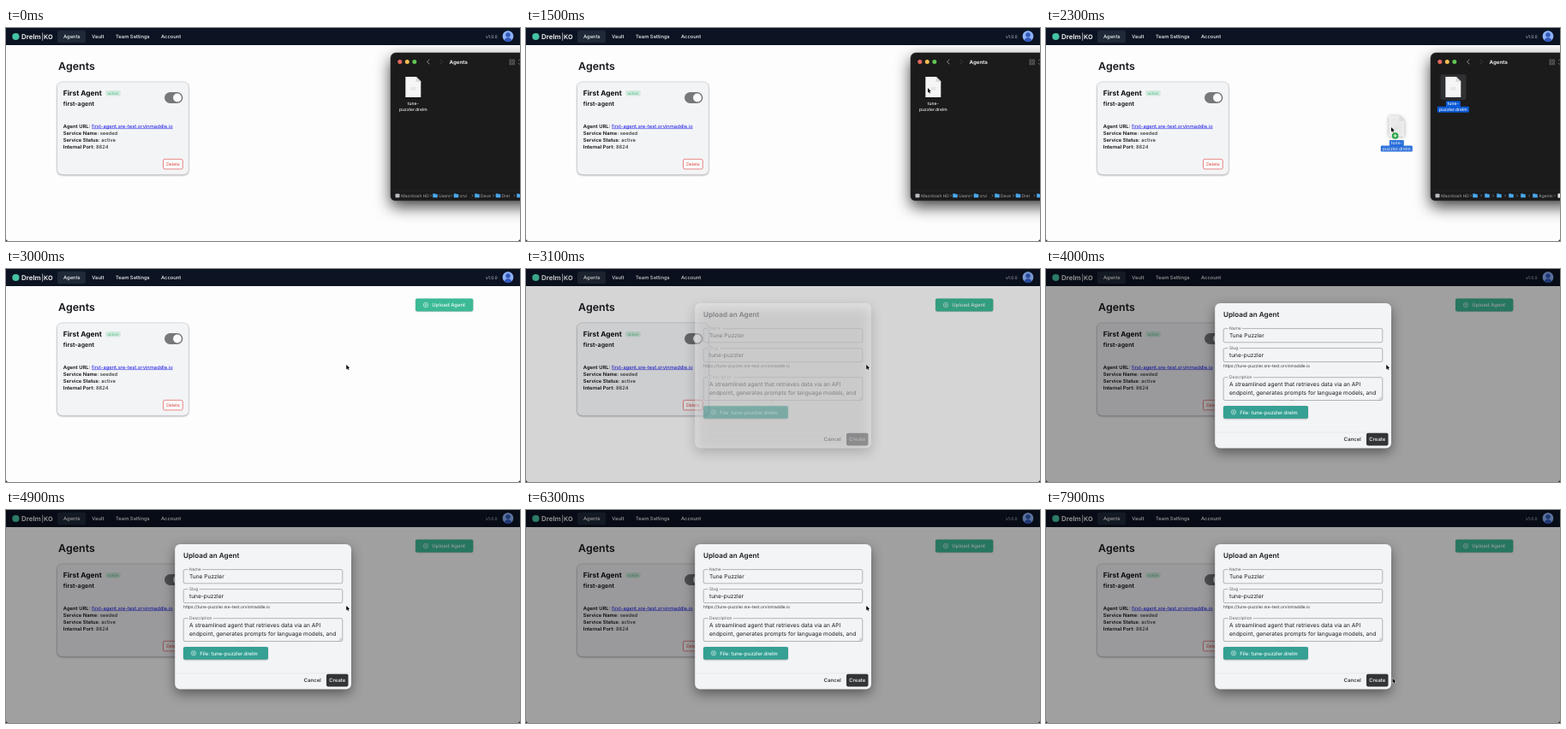
Write an HTML page with a canvas that moves like this. It is 600 by 249 pixels and loops after 8000 ms.

```html
<!DOCTYPE html>
<html lang="en">
<head>
<meta charset="utf-8">
<title>Agent upload</title>
<style>
html, body { margin: 0; width: 100%; height: 100%; overflow: hidden; background: #fdfdfd; }
canvas { display: block; width: 600px; height: 249px; }
</style>
</head>
<body>
<canvas id="stage"></canvas>
<script>
const W = 600, H = 249, LOOP = 8000;
const canvas = document.getElementById('stage');
const ctx = canvas.getContext('2d');
const ratio = window.devicePixelRatio || 1;
canvas.width = W * ratio;
canvas.height = H * ratio;

const HOST = 'sre-test.orvinmaddle.io';
const GRAB = [469, 70.3];
const SELECT_AT = 1600, DRAG_AT = 1700, DROP_AT = 2900;

// Pointer stops: time, x, y
const STOPS = [
  [1000, 602, 112], [1500, ...GRAB], [DRAG_AT, ...GRAB],
  [2300, 403, 116], [2650, 397.3, 112], [7350, 397.3, 112], [7900, 404.6, 196.8]
];

const smooth = p => p * p * (3 - 2 * p);
const progress = (t, a, b) => Math.min(1, Math.max(0, (t - a) / (b - a)));

function pointerAt(t) {
  let i = 0;
  while (i < STOPS.length - 2 && t > STOPS[i + 1][0]) i++;
  const [t0, x0, y0] = STOPS[i], [t1, x1, y1] = STOPS[i + 1];
  const p = smooth(progress(t, t0, t1));
  return [x0 + (x1 - x0) * p, y0 + (y1 - y0) * p];
}

// Type is set large and scaled down evenly, so small sizes keep exact spacing.
const TYPE_SCALE = 10;

function textWidth(str, size, weight = 400) {
  ctx.font = `${weight} ${size * TYPE_SCALE}px Inter, sans-serif`;
  return ctx.measureText(str).width / TYPE_SCALE;
}

function text(str, x, y, size, color, weight = 400, align = 'left') {
  const width = textWidth(str, size, weight);
  ctx.save();
  ctx.translate(x, y);
  ctx.scale(1 / TYPE_SCALE, 1 / TYPE_SCALE);
  ctx.textRendering = 'geometricPrecision';
  ctx.textAlign = align;
  ctx.fillStyle = color;
  ctx.fillText(str, 0, 0);
  ctx.restore();
  return width;
}

function box(x, y, w, h, r, fill, stroke, line = 0.6) {
  ctx.beginPath();
  ctx.roundRect(x, y, w, h, r);
  if (fill) { ctx.fillStyle = fill; ctx.fill(); }
  if (stroke) { ctx.strokeStyle = stroke; ctx.lineWidth = line; ctx.stroke(); }
}

function disc(x, y, r, fill) {
  ctx.beginPath();
  ctx.arc(x, y, r, 0, Math.PI * 2);
  ctx.fillStyle = fill;
  ctx.fill();
}

function poly(points, stroke, line, fill) {
  ctx.beginPath();
  points.forEach(([x, y]) => ctx.lineTo(x, y));
  if (fill) { ctx.closePath(); ctx.fillStyle = fill; ctx.fill(); }
  if (stroke) { ctx.strokeStyle = stroke; ctx.lineWidth = line; ctx.stroke(); }
}

function shadowed(color, blur, dy, draw) {
  ctx.save();
  ctx.shadowColor = color;
  ctx.shadowBlur = blur * ratio;
  ctx.shadowOffsetY = dy * ratio;
  draw();
  ctx.restore();
}

function plus(x, y, r, color, line) {
  poly([[x - r, y], [x + r, y]], color, line);
  poly([[x, y - r], [x, y + r]], color, line);
}

function plusRing(x, y) {
  ctx.beginPath();
  ctx.arc(x, y, 2.7, 0, Math.PI * 2);
  ctx.strokeStyle = '#effaf6';
  ctx.lineWidth = 0.6;
  ctx.stroke();
  plus(x, y, 1.3, '#effaf6', 0.6);
}

function chevron(x, y, w, h, color, line) {
  poly([[x - w, y - h], [x + w, y], [x - w, y + h]], color, line);
}

function navbar() {
  ctx.fillStyle = '#0c1322';
  ctx.fillRect(0, 0, W, 20);
  disc(11.4, 10, 4.1, '#45c3a2');
  text('Drelm', 18, 13, 8, '#f4f5f7', 600);
  poly([[42.6, 5.5], [42.6, 14.8]], '#e4e6ea', 0.7);
  text('KO', 44, 13, 7.4, '#f4f5f7', 600);
  box(60, 2.8, 33, 14.4, 2.5, '#1f2937');
  const items = { Agents: 67, Vault: 100.3, 'Team Settings': 128, Account: 181 };
  for (const [label, x] of Object.entries(items)) text(label, x, 12.2, 5.83, '#f5f6f8', 500);
  text('v1.0.0', 560, 11.8, 5, '#c8cdd6');
  ctx.save();
  ctx.beginPath();
  ctx.arc(586, 9.6, 6.6, 0, Math.PI * 2);
  ctx.clip();
  disc(586, 9.6, 6.6, '#8db1f7');
  disc(586, 8, 2.7, '#3157b8');
  disc(586, 16.2, 4.9, '#3157b8');
  ctx.restore();
}

function agentCard() {
  shadowed('rgba(0,0,0,0.4)', 2, 0.8, () => box(59.6, 63, 153.7, 108.4, 6, '#f3f4f6'));
  box(59.6, 63, 153.7, 108.4, 6, null, '#c3c6cb', 0.5);
  text('First Agent', 66.8, 79, 8.4, '#0c0d10', 700);
  box(116, 73, 18, 6.6, 3.3, '#cfeadd');
  text('active', 125, 77.7, 4.3, '#58b986', 400, 'center');
  text('first-agent', 66.8, 91, 7, '#0c0d10', 600);
  box(185, 75, 21.4, 13, 6.5, '#77787b');
  disc(200, 81.5, 4.9, '#fbfbfc');

  const rows = [
    ['Agent URL:', 'first-agent.' + HOST], ['Service Name:', 'seeded'],
    ['Service Status:', 'active'], ['Internal Port:', '8824']
  ];
  rows.forEach(([label, value], i) => {
    const y = 116.6 + i * 8.2;
    const x = 66.8 + text(label, 66.8, y, 5.83, '#0c0d10', 600) + 1.7;
    const w = text(value, x, y, 5.83, i ? '#15171b' : '#1414e6');
    if (!i) poly([[x, y + 1], [x + w, y + 1]], '#1414e6', 0.5);
  });

  box(183.5, 153.3, 22.8, 11.6, 1.8, '#fafafa', '#e25555', 0.7);
  text('Delete', 194.9, 161, 5.1, '#e03d3d', 400, 'center');
}

function page() {
  ctx.fillStyle = '#111';
  ctx.fillRect(0, 0, W, H);
  box(0, 0, W, H, [0, 0, 3, 3], '#fdfdfd');
  navbar();
  text('Agents', 61, 49, 12.5, '#15171b', 600);
  shadowed('rgba(0,0,0,0.25)', 1.5, 0.5, () => box(478, 34.6, 67.3, 14.8, 1.8, '#3cba97'));
  plusRing(490, 42);
  text('Upload Agent', 497.3, 44.2, 5.95, '#f2fbf8', 500);
  agentCard();
}

function fileIcon(x, y, blur = 2) {
  const sheet = [[x - 9, y - 12], [x + 3.5, y - 12], [x + 9, y - 6.5], [x + 9, y + 12], [x - 9, y + 12]];
  shadowed('rgba(0,0,0,0.4)', blur, 0.5, () => poly(sheet, null, 0, '#f5f5f5'));
  poly([[x + 3.5, y - 12], [x + 9, y - 6.5], [x + 3.5, y - 6.5]], '#c3c3c3', 0.3, '#dcdcdc');
  for (const dy of [1, 3]) poly([[x - 3, y + dy], [x + 3, y + dy]], '#d4d4d4', 0.8);
}

function fileLabel(x, y, selected) {
  if (selected) {
    box(x - 8.5, y - 3.2, 17, 7, 1.3, '#0b5ad6');
    box(x - 18.5, y + 3.4, 37, 7, 1.3, '#0b5ad6');
  }
  text('tune-', x, y + 1.8, 5, '#f4f4f4', 500, 'center');
  text('puzzler.drelm', x, y + 8.6, 5, '#f4f4f4', 500, 'center');
}

function folder(x) {
  box(x - 2.8, 193.6, 3, 2, 0.5, '#3f95d6');
  box(x - 2.8, 194.3, 5.6, 4, 0.5, '#4ba8ea');
}

function pathBar(selected) {
  poly([[449, 190.3], [600, 190.3]], '#2e2f30', 0.5);
  box(454.5, 193.8, 5, 4.4, 0.7, '#b9bcc0');
  const label = (str, x) => text(str, x, 198, 4.9, '#a9abad');
  const arrow = x => chevron(x, 196, 0.6, 1.3, '#9a9c9e', 0.6);
  label('Macintosh HD', 461.3);
  arrow(496);
  if (selected) {
    for (let i = 0; i < 6; i++) {
      folder(501 + i * 14);
      if (i < 5) arrow(508 + i * 14);
    }
    label('Agents', 575.3);
    arrow(593.8);
    box(597.4, 193.4, 4, 5.2, 0.4, '#e8e8e8');
  } else {
    ['Users', 'orvi', 'Deve', 'Drel', ''].forEach((name, i) => {
      const x = 501 + i * 24.5;
      folder(x);
      label(name, x + 4);
      arrow(x + 19);
    });
  }
}

function finder(selected) {
  const frame = (...paint) => box(449, 29, 170, 172.7, [6, 0, 0, 5], ...paint);
  shadowed('rgba(0,0,0,0.75)', 18, 7, () => frame('#1b1b1c'));
  pathBar(selected);
  frame(null, '#2a2a2b', 0.5);

  ['#ec6a5e', '#f4bf4f', '#61c554'].forEach((c, i) => disc(459.8 + i * 8.5, 39.5, 2.5, c));
  chevron(493, 39.5, -1.4, 2.8, '#c5c6c8', 0.7);
  chevron(508, 39.5, 1.4, 2.8, '#4c4d4f', 0.7);
  text('Agents', 517.5, 41.8, 6.1, '#ececec', 700);
  for (const x of [587.8, 591.4]) for (const y of [37, 40.6]) box(x, y, 2.3, 2.3, 0.4, null, '#a5a6a8', 0.5);
  poly([[597.8, 38.4], [599.2, 37], [600.6, 38.4]], '#a5a6a8', 0.5);
  poly([[597.8, 41], [599.2, 42.4], [600.6, 41]], '#a5a6a8', 0.5);

  if (selected) box(460.5, 54.3, 30, 29.7, 2, '#303133');
  fileIcon(475.3, 69);
  fileLabel(475.3, 88.4, selected);
}

function field(label, y, h) {
  box(207.2, y, 185.6, h, 1.8, null, '#85878b', 0.6);
  ctx.fillStyle = '#f3f4f6';
  ctx.fillRect(212.6, y - 1, textWidth(label, 4.9) + 2.8, 2);
  text(label, 214, y + 1.6, 4.9, '#5d5f63');
}

function dialog() {
  const ink = '#1a1c20';
  shadowed('rgba(0,0,0,0.45)', 14, 5, () => box(197.2, 40, 205.8, 169.5, 6, '#f3f4f6'));
  text('Upload an Agent', 207, 56, 8.15, ink, 600);
  field('Name', 69.6, 16.2);
  text('Tune Puzzler', 214, 79.9, 6.6, ink);
  field('Slug', 92.6, 16);
  text('tune-puzzler', 214, 102.9, 6.6, ink);
  text('https://tune-puzzler.' + HOST, 207, 114.8, 4.9, '#333538');
  field('Description', 126.7, 26.8);

  ctx.save();
  ctx.beginPath();
  ctx.rect(208, 130, 184, 23.2);
  ctx.clip();
  [
    'A streamlined agent that retrieves data via an API',
    'endpoint, generates prompts for language models, and',
    'processes output for effective user interaction.'
  ].forEach((line, i) => text(line, 214, 137.2 + i * 10.2, 6.6, ink));
  ctx.restore();
  poly([[388.8, 152.5], [391.8, 149.5]], '#77797d', 0.5);
  poly([[390.4, 152.5], [391.8, 151.1]], '#77797d', 0.5);

  shadowed('rgba(0,0,0,0.3)', 1.5, 0.6, () => box(207, 160, 99, 14.8, 1.8, '#35a093'));
  plusRing(219, 167.4);
  text('File: tune-puzzler.drelm', 226.3, 169.6, 5.95, '#f2fbf8', 500);
  poly([[197.2, 191], [403, 191]], '#d9dadd', 0.5);
  text('Cancel', 357.8, 201.2, 6, ink, 500, 'center');
  box(374, 191.8, 25.5, 14.6, 1.8, '#333436');
  text('Create', 386.8, 201.2, 6, '#f6f6f6', 500, 'center');
}

function pointer(x, y) {
  const arrow = [[0, 0], [0, 5.3], [1.2, 4.3], [2, 6.1], [2.9, 5.7], [2.1, 3.9], [3.7, 3.8], [0, 0]];
  const points = arrow.map(([dx, dy]) => [x + dx, y + dy]);
  poly(points, '#fff', 0.9, '#000');
  poly(points, null, 0, '#000');
}

function render(t) {
  ctx.setTransform(ratio, 0, 0, ratio, 0, 0);
  const [px, py] = pointerAt(t);
  page();

  if (t < DROP_AT) finder(t >= SELECT_AT);
  if (t >= DRAG_AT && t < DROP_AT) {
    const dx = px - GRAB[0], dy = py - GRAB[1];
    ctx.globalAlpha = 0.85;
    fileIcon(475.3 + dx, 69 + dy, 4);
    fileLabel(475.3 + dx, 88.4 + dy, true);
    ctx.globalAlpha = 1;
  }

  const open = smooth(progress(t, 3020, 3200));
  if (open > 0) {
    ctx.fillStyle = `rgba(0,0,0,${0.37 * open})`;
    ctx.fillRect(0, 0, W, H);
    ctx.globalAlpha = open;
    dialog();
    ctx.globalAlpha = 1;
  }

  if (t >= 1000) pointer(px, py);
  if (t >= 2000 && t < DROP_AT) {
    disc(px + 4.6, py + 10, 3.8, '#28a745');
    plus(px + 4.6, py + 10, 2, '#fff', 0.9);
  }
}

const start = performance.now();
function tick() {
  render((performance.now() - start) % LOOP);
  requestAnimationFrame(tick);
}
tick();
</script>
</body>
</html>
```
